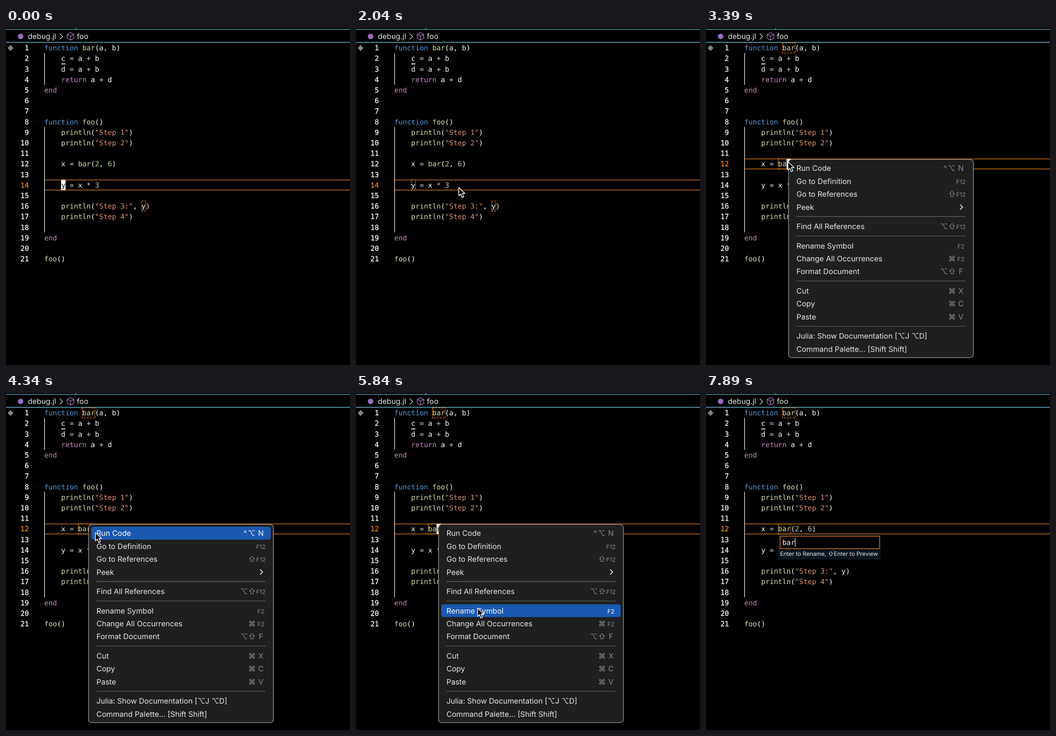
An HTML page that plays this animation: 755x741 px, repeating every 8000 ms.

```html
<!DOCTYPE html>
<html lang="en">
<head>
<meta charset="utf-8">
<title>Editor: rename symbol</title>
<style>
  html, body { margin: 0; width: 100%; height: 100%; overflow: hidden; background: #000; }
  svg { display: block; }
  text { white-space: pre; text-rendering: geometricPrecision; fill: #fff; }
  .code { font: 15.42px "DejaVu Sans Mono", monospace; }
  .num { text-anchor: end; stroke: #fff; stroke-width: .3px; }
  .num.on { fill: #f38518; stroke: #f38518; }
  .ui { font: 16.4px Inter, sans-serif; fill: #e8e8e8; }
  .key { text-anchor: middle; fill: #8c8c8c; }
  .small { font-size: 13px; }
  .hint { font-size: 12.6px; }
  .item .bar { fill: none; }
  .item.on .bar { fill: #1b58b0; }
  .item.on text { fill: #fff; }
  .kw { fill: #569cd6; } .ctl { fill: #c586c0; } .fn { fill: #dcdcaa; }
  .str { fill: #dd9278; } .lit { fill: #b5cea8; } .op { fill: #d4d4d4; }
  .line { fill: none; stroke-width: 1.3; }
  .orange { stroke: #f38518; }
  .dash { stroke-dasharray: 4 2.4; }
</style>
</head>
<body>
<svg id="stage" width="755" height="741" viewBox="0 0 755 741"></svg>
<script>
const LOOP = 8000, LEFT = 84, CHAR = 9.283, ROW = 23.2;
const colX = col => LEFT + col * CHAR;
const rowY = row => 43.5 + (row - 1) * ROW;

const source = `function bar(a, b)
    c = a + b
    d = a + b
    return a + d
end


function foo()
    println("Step 1")
    println("Step 2")

    x = bar(2, 6)

    y = x * 3

    println("Step 3:", y)
    println("Step 4")

end

foo()`.split('\n');

const kinds = [
  ['str', /^"/], ['kw', /^function$/], ['ctl', /^(end|return)$/],
  ['lit', /^\d/], ['op', /^[=+*]/], ['fn', /^\w/]
];
const highlight = line => line
  .split(/("[^"]*"|\b(?:function|end|return)\b|\w+(?=\()|\d+|[=+*])/)
  .map((part, i) => i % 2
    ? `<tspan class="${kinds.find(k => k[1].test(part))[0]}">${part}</tspan>` : part)
  .join('');

const code = source.map((line, i) => {
  const y = rowY(i + 1) + 5.6;
  return `<text class="code num" x="50.3" y="${y}">${i + 1}</text>
    <text class="code" x="${LEFT}" y="${y}">${highlight(line)}</text>`;
}).join('');

const rect = (x, y, w, h, attrs) =>
  `<rect x="${x}" y="${y}" width="${w}" height="${h}" ${attrs}/>`;
const outline = (row, col, chars) =>
  rect(colX(col) + .2, rowY(row) - 11, chars * CHAR, 22.4, 'class="line orange dash"');
const block = (id, row, col, letter) => `<g id="${id}">
  ${rect(colX(col), rowY(row) - 11, CHAR, 22.4, 'fill="#fff"')}
  <text class="code" x="${colX(col)}" y="${rowY(row) + 5.6}" style="fill:#000">${letter}</text></g>`;

// label, centre y, shortcut keys as [text, centre x]
const OPT = ['⌥', 522.5], SHIFT = ['⇧', 540], CMD = ['⌘', 540];
const items = [
  ['Run Code', 308.5, ['^', 525], ['⌥', 539], ['N', 559.5]],
  ['Go to Definition', 337, ['F12', 559.5]],
  ['Go to References', 365.3, SHIFT, ['F12', 559.5]],
  ['Peek', 393.7],
  ['Find All References', 436.2, OPT, SHIFT, ['F12', 559.5]],
  ['Rename Symbol', 478.8, ['F2', 559.5]],
  ['Change All Occurrences', 507.2, CMD, ['F2', 559.5]],
  ['Format Document', 535.6, OPT, SHIFT, ['F', 559.5]],
  ['Cut', 578.1, CMD, ['X', 559.5]],
  ['Copy', 606.5, CMD, ['C', 559.5]],
  ['Paste', 634.8, CMD, ['V', 559.5]],
  ['Julia: Show Documentation [⌥J ⌥D]', 677.4],
  ['Command Palette... [Shift Shift]', 705.8]
];
const menuItem = ([label, y, ...keys]) => `<g class="item">
  ${rect(187, y - 14.4, 394, 28.4, 'rx="5" class="bar"')}
  <text class="ui" x="198.5" y="${y + 5.8}">${label}</text>
  ${keys.map(([k, x]) =>
    `<text class="ui key ${/^F\d/.test(k) ? 'small' : ''}" x="${x}" y="${y + 5.8}">${k}</text>`).join('')}
</g>`;
const separators = [414.5, 457.3, 556.3, 655.8].map(y => `M198.5 ${y}H569.5`).join('');

const stage = document.getElementById('stage');
stage.innerHTML = `
  <path class="line" stroke="#6fc3df" d="M0 3.1H755M0 31.5H755M153 0V3"/>
  <circle cx="32" cy="18.5" r="6" fill="#9a6cbd"/>
  <text class="ui" x="48" y="24.3">debug.jl</text>
  <path class="line" stroke="#ddd" d="M118 12.5L124.5 18.7L118 25"/>
  <path class="line" stroke="#b180d7" stroke-linejoin="round"
    d="M141.5 10L148.7 14V22.5L141.5 26.7L134.3 22.5V14ZM134.3 14L141.5 18L148.7 14M141.5 18V26.7"/>
  <text class="ui" x="155.5" y="24.3">foo</text>
  <path fill="#848484" d="M10 37.5L16.5 44L10 50.5L3.5 44Z"/>
  <path class="line" stroke="#fff" d="M84.6 55V125M84.6 217.5V449.5"/>
  <path id="current" class="line orange" d="M85.2 -10.9H755M85.2 11.2H755"/>
  ${code}
  ${rect(121.3, 78, 9, 2, 'fill="#e8e8e8"')}
  <g id="marksY">${outline(14, 4, 1)}${outline(16, 23, 1)}</g>
  <g id="marksBar">${outline(1, 9, 3)}${outline(12, 8, 3)}</g>
  ${block('blockY', 14, 4, 'y')}
  ${block('blockR', 12, 10, 'r')}
  <g id="menu">
    ${rect(181.2, 288.9, 405.6, 436, 'rx="7" fill="#1e1f1f" stroke="#a4a4a4" stroke-width="1.3"')}
    ${items.map(menuItem).join('')}
    <path class="line" stroke="#606060" d="${separators}"/>
    <path class="line" stroke="#e8e8e8" style="stroke-width:1.8" d="M557.5 388.2L563.3 393.8L557.5 399.4"/>
  </g>
  <g id="rename">
    ${rect(158.5, 311, 224.5, 55, 'fill="#0c141f"')}
    ${rect(162.7, 315, 218.2, 27.2, 'fill="#000" class="line orange" style="fill:#000"')}
    ${rect(167.5, 319, 3 * CHAR, 19, 'id="selection" fill="#3f638b"')}
    <text class="code" x="167.5" y="334">bar</text>
    ${rect(195, 319.5, 1.3, 18, 'id="caret" fill="#fff"')}
    <text class="ui hint" x="162.5" y="358.3">Enter to Rename, ⇧Enter to Preview</text>
  </g>
  <path id="mouse" fill="#000" stroke="#fff" stroke-width="1.5" stroke-linejoin="round"
    d="M.8 1V19.2L5 15.3L8.1 22.6L11.5 21.2L8.4 14H14.2Z"/>`;

const el = Object.fromEntries([...stage.querySelectorAll('[id]')].map(e => [e.id, e]));
const numbers = [...stage.querySelectorAll('.num')];
const rows = [...stage.querySelectorAll('.item')];

// time, x, y of the pointer tip
const pointer = [
  [40, 433, 628], [340, 433, 628], [540, 270, 412], [1740, 270, 412],
  [2040, 225, 350], [2390, 179, 293], [4339, 179, 293], [4340, 195.5, 306],
  [4490, 195.5, 306], [4590, 233, 376], [4690, 262.5, 445],
  [4840, 266, 464], [4990, 266, 472], [LOOP, 266, 472]
];
// spans during which each part is visible
const spans = {
  blockY: [[0, 40], [540, 1040], [1390, 1980]],
  blockR: [[2540, 3140], [3390, 3990], [4740, 5190], [5740, 6240], [6740, 7040]],
  marksY: [[0, 2540]],
  marksBar: [[3090, LOOP]],
  menu: [[3390, 6990]],
  rename: [[7040, LOOP]],
  selection: [[7040, 7780]],
  caret: [[7780, LOOP]],
  mouse: [[40, 7040]]
};

function pointerAt(t) {
  const i = Math.max(1, pointer.findIndex(p => p[0] > t));
  const [t0, x0, y0] = pointer[i - 1], [t1, x1, y1] = pointer[i];
  const k = Math.max(0, (t - t0) / (t1 - t0));
  return [x0 + (x1 - x0) * k, y0 + (y1 - y0) * k];
}

function draw(t) {
  for (const id in spans) {
    const shown = spans[id].some(([from, to]) => t >= from && t < to);
    el[id].style.display = shown ? '' : 'none';
  }
  const row = t < 2540 ? 14 : 12;
  el.current.setAttribute('transform', `translate(0 ${rowY(row)})`);
  numbers.forEach((n, i) => n.classList.toggle('on', i + 1 === row));

  const [x, y] = pointerAt(t);
  el.mouse.setAttribute('transform', `translate(${x} ${y})`);
  const flash = t >= 6640 && t < 6690;
  rows.forEach((r, i) =>
    r.classList.toggle('on', t >= 4340 && !flash && Math.abs(y - items[i][1]) <= 14.2));
  el.menu.style.opacity = t < 6790 ? 1 : Math.max(0, 1 - (t - 6740) / 260);
}

const start = performance.now();
function tick() {
  draw((performance.now() - start) % LOOP);
  requestAnimationFrame(tick);
}
draw(0);
requestAnimationFrame(tick);
</script>
</body>
</html>
```
